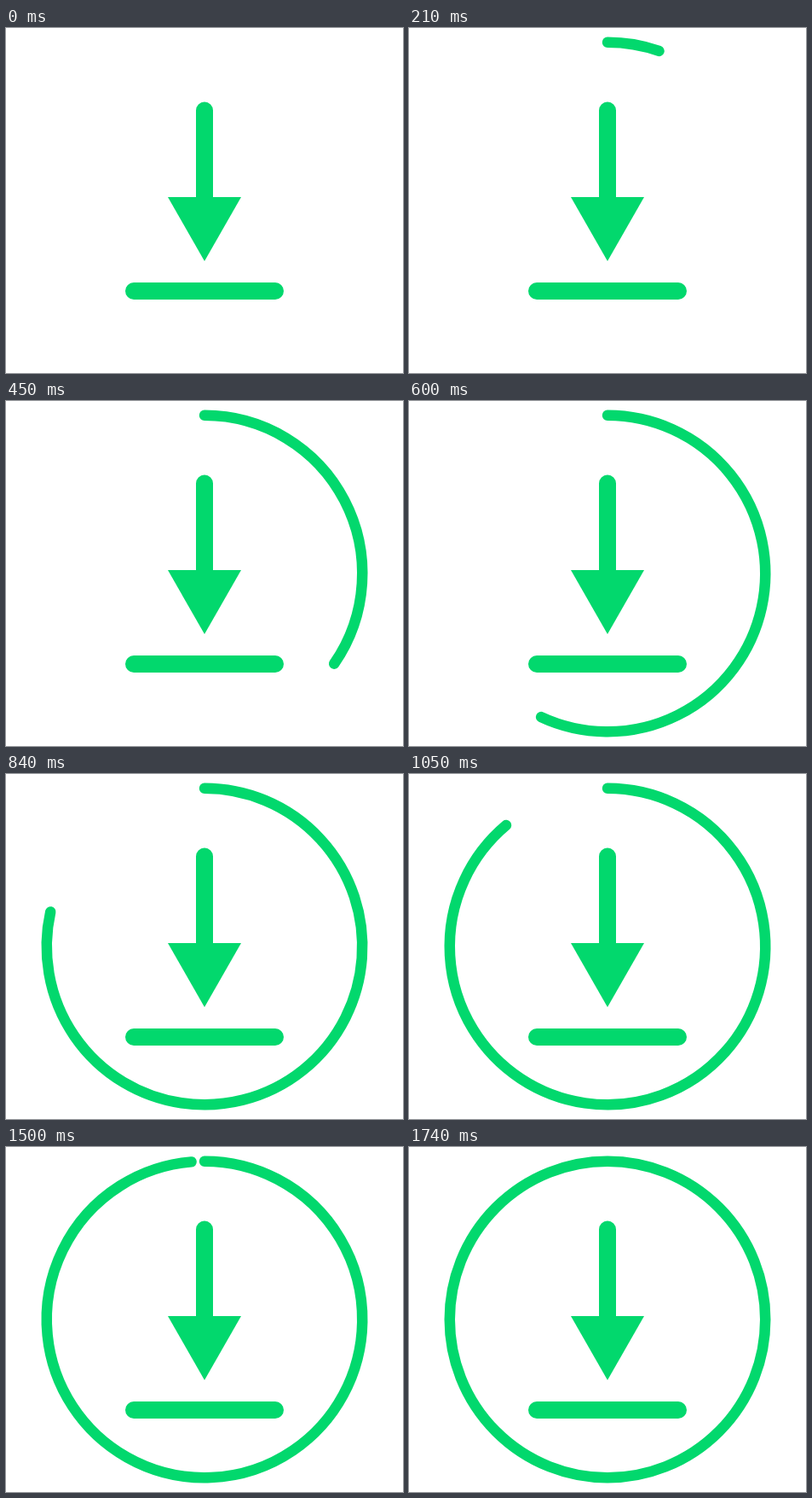
Write an HTML page that moves like this. It is 466 by 404 pixels and loops after 2400 ms.

```html
<!DOCTYPE html>
<html lang="en">
<head>
<meta charset="utf-8">
<title>Download progress</title>
<style>
  html, body { margin: 0; width: 100%; height: 100%; overflow: hidden; background: #fff; }
  svg { display: block; width: 100vw; height: 100vh; }
</style>
</head>
<body>
<svg viewBox="0 0 466 404" fill="none" stroke="#02d86d" stroke-linecap="round">
  <path id="ring" stroke-width="12.5"/>
  <path d="M233 96.5V200M150 308H316" stroke-width="20"/>
  <path d="M190 198H276L233 273Z" fill="#02d86d" stroke="none"/>
</svg>
<script>
const LOOP = 2400, STEP = 30, DRAW = 1790, CLOSED = 1740;
const CX = 233, CY = 202, R = 185.25;
const ring = document.getElementById('ring');

// Cubic Bezier easing with handles (x1, 0) and (x2, 1).
function ease(x, x1 = 0.348, x2 = 0.135) {
  let low = 0, high = 1;
  for (let i = 0; i < 30; i++) {
    const s = (low + high) / 2, r = 1 - s;
    const at = 3 * x1 * s * r * r + 3 * x2 * s * s * r + s ** 3;
    if (at < x) low = s; else high = s;
  }
  return low * low * (3 - 2 * low);
}

function arcPath(fraction) {
  if (fraction <= 0) return '';
  const top = `M${CX} ${CY - R}`;
  if (fraction >= 1) return `${top}a${R} ${R} 0 1 1 0 ${2 * R}a${R} ${R} 0 1 1 0 ${-2 * R}Z`;
  const angle = fraction * 2 * Math.PI;
  const x = CX + R * Math.sin(angle), y = CY - R * Math.cos(angle);
  return `${top}A${R} ${R} 0 ${fraction > 0.5 ? 1 : 0} 1 ${x.toFixed(3)} ${y.toFixed(3)}`;
}

function render(ms) {
  const t = Math.floor((ms % LOOP) / STEP) * STEP;
  const fraction = t === 0 ? 0 : t >= CLOSED ? 1 : ease(t / DRAW);
  ring.setAttribute('d', arcPath(fraction));
}

const start = performance.now();
function tick() {
  render(performance.now() - start);
  requestAnimationFrame(tick);
}
tick();
</script>
</body>
</html>
```
